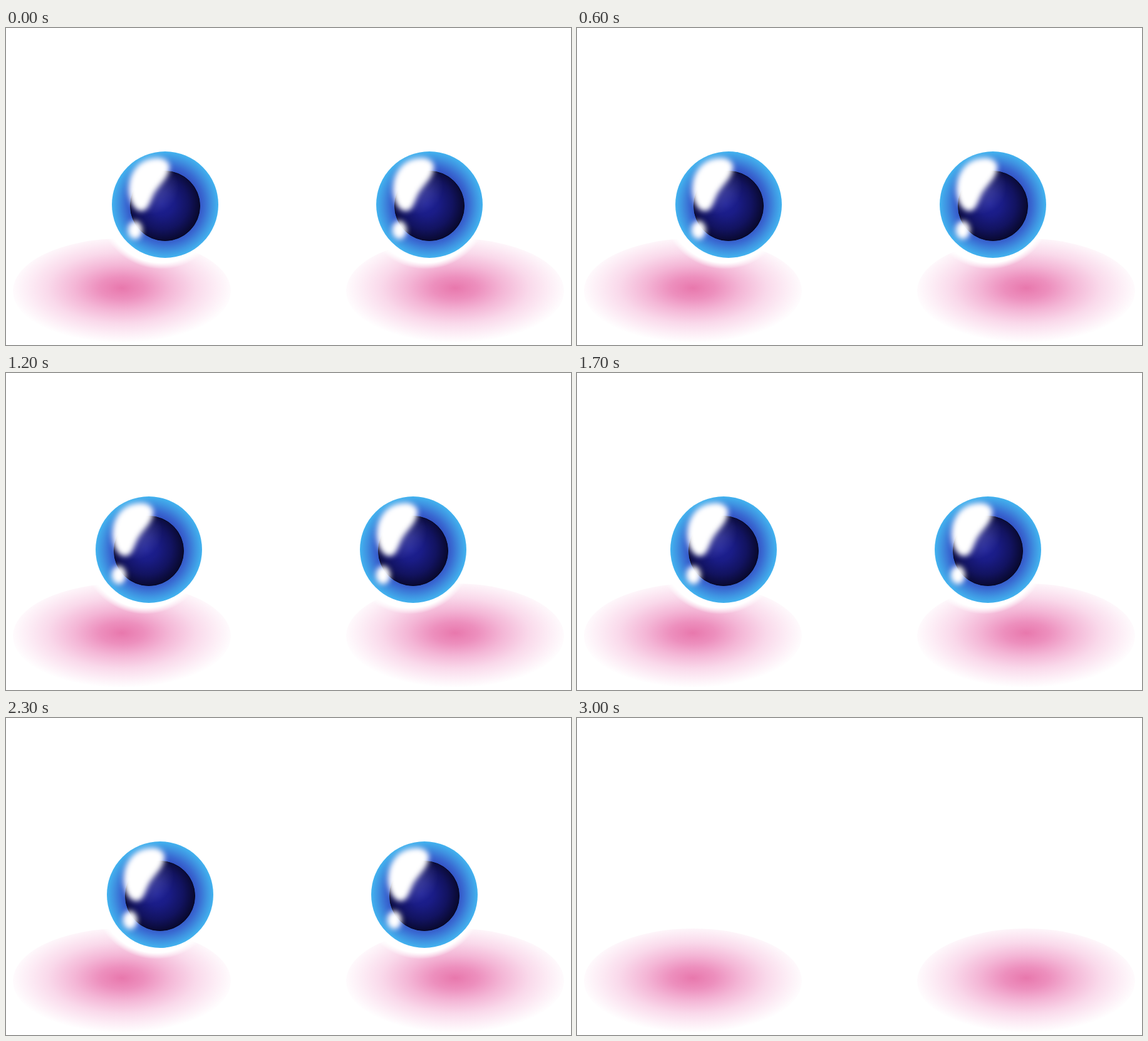
Animation, 902 px wide and 506 px high, one loop 3.1 s. Source, as an HTML page:

```html
<!DOCTYPE html>
<html lang="en">
<head>
<meta charset="utf-8">
<title>Looking eyes</title>
<style>
  html, body { margin: 0; width: 100%; height: 100%; overflow: hidden; background: #fff; }
  svg { display: block; }
</style>
</head>
<body>
<svg width="902" height="506" viewBox="0 0 902 506">
  <defs>
    <radialGradient id="blush" cy=".47" r=".52">
      <stop offset="0" stop-color="#dc3282" stop-opacity=".66"/>
      <stop offset=".2" stop-color="#de3488" stop-opacity=".55"/>
      <stop offset=".42" stop-color="#e0368e" stop-opacity=".36"/>
      <stop offset=".65" stop-color="#e23894" stop-opacity=".19"/>
      <stop offset=".85" stop-color="#e43a98" stop-opacity=".08"/>
      <stop offset="1" stop-color="#e43a98" stop-opacity="0"/>
    </radialGradient>
    <radialGradient id="glow">
      <stop offset=".9" stop-color="#fff"/>
      <stop offset="1" stop-color="#fff" stop-opacity="0"/>
    </radialGradient>
    <radialGradient id="iris">
      <stop offset=".62" stop-color="#3350c4"/>
      <stop offset=".74" stop-color="#396bd2"/>
      <stop offset=".88" stop-color="#3f94e2"/>
      <stop offset="1" stop-color="#42b3ef"/>
    </radialGradient>
    <radialGradient id="pupil" cx=".46" cy=".47" r=".57">
      <stop offset="0" stop-color="#1d2096"/>
      <stop offset=".3" stop-color="#1a1c86"/>
      <stop offset=".65" stop-color="#121360"/>
      <stop offset="1" stop-color="#070726"/>
    </radialGradient>
    <radialGradient id="sheen">
      <stop offset="0" stop-color="#fff" stop-opacity=".22"/>
      <stop offset="1" stop-color="#fff" stop-opacity="0"/>
    </radialGradient>
    <filter id="soft" x="-30%" y="-30%" width="160%" height="160%" color-interpolation-filters="sRGB">
      <feGaussianBlur stdDeviation="4.4"/>
    </filter>
    <clipPath id="inPupil"><circle cy="2" r="55.5"/></clipPath>
    <g id="eye">
      <circle cx="-6" cy="1" r="102" fill="url(#glow)"/>
      <circle r="85" fill="url(#iris)"/>
      <circle cy="2" r="55.5" fill="url(#pupil)" stroke="#05051c"/>
      <circle cx="-22" cy="-28" r="44" fill="url(#sheen)" clip-path="url(#inPupil)"/>
      <g fill="#fff" stroke="#fff" stroke-width="4" filter="url(#soft)">
        <path d="M-20-72C-4-75 6-68 5-58C3-42-13-32-20-18C-26-6-28 8-38 8C-50 8-57-14-56-28C-55-50-42-69-20-72Z"/>
        <ellipse cx="-48" cy="40.5" rx="9.5" ry="12.5"/>
      </g>
    </g>
  </defs>
  <ellipse cx="185" cy="420" rx="174" ry="84" fill="url(#blush)"/>
  <ellipse cx="717" cy="420" rx="174" ry="84" fill="url(#blush)"/>
  <g id="eyes">
    <use href="#eye"/>
    <use href="#eye" x="422"/>
  </g>
</svg>
<script>
  const STEP = 100, STEPS = 31, TURN = 13;
  const eyes = document.getElementById('eyes');

  // Two pixels per step each way, with one double step on the way left.
  function eyeX(i) {
    if (i >= TURN) return 226 + 2 * (i - TURN);
    return 254 - 2 * i - (i > 6 ? 2 : 0);
  }

  function draw(now) {
    const i = Math.floor(now / STEP) % STEPS;
    eyes.setAttribute('transform', `translate(${eyeX(i)} 282)`);
    eyes.setAttribute('visibility', i === STEPS - 1 ? 'hidden' : 'visible');
  }

  const start = performance.now();
  function tick() {
    draw(performance.now() - start);
    requestAnimationFrame(tick);
  }
  tick();
</script>
</body>
</html>
```
